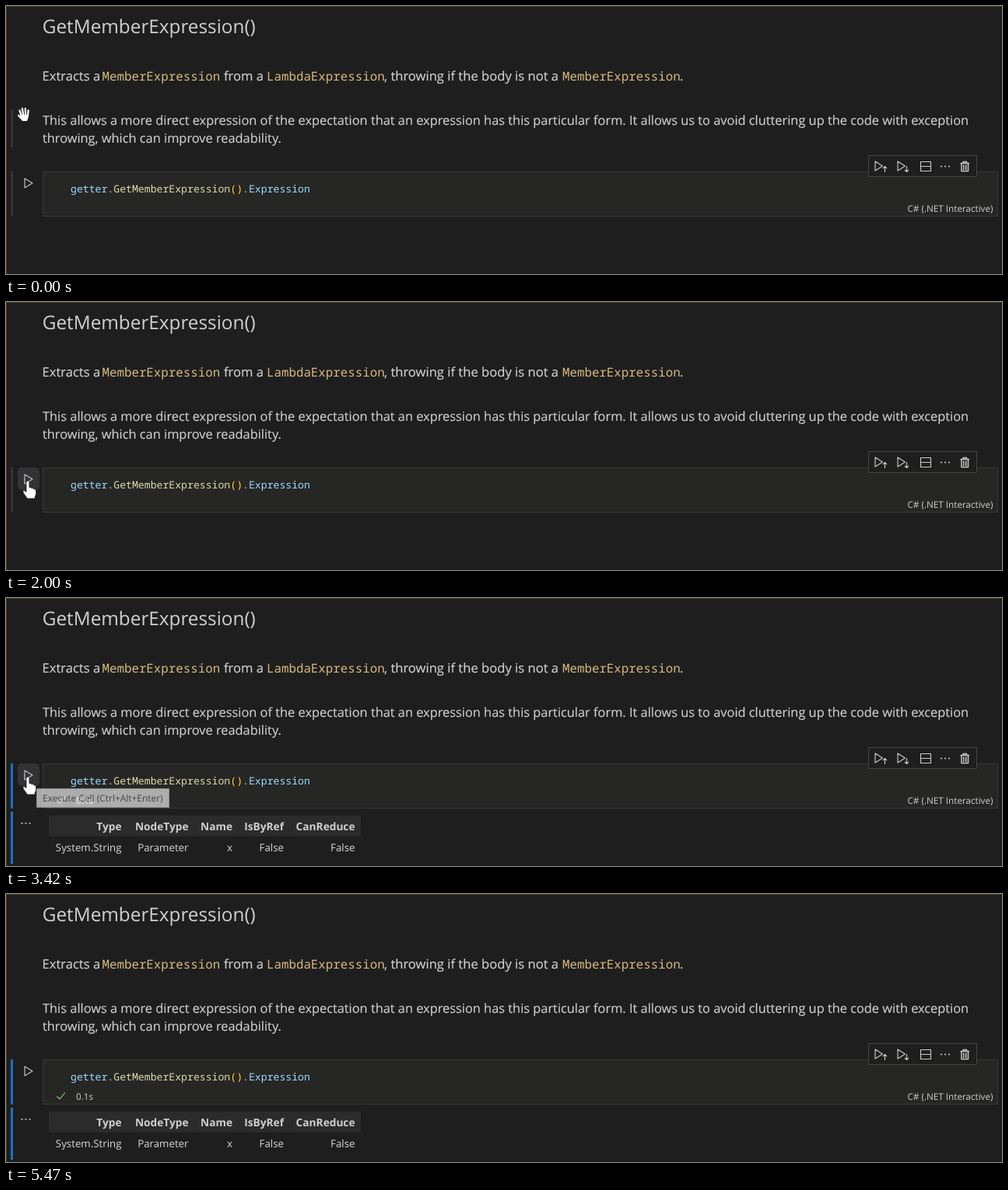
Recreate the animation shown at these times as an HTML page. Size 1280 by 345 pixels, loop 5520 ms.

```html
<!DOCTYPE html>
<html lang="en">
<head>
<meta charset="utf-8">
<title>Notebook cell</title>
<style>
html, body { margin: 0; width: 100%; height: 100%; overflow: hidden; background: #1e1e1e; }
svg { display: block; width: 100vw; height: 100vh; }
text { font-family: "Open Sans", "Noto Sans", sans-serif; fill: #d0d0d0; text-rendering: geometricPrecision; }
.h { font-size: 24.3px; }
.p { font-size: 16.37px; }
.lead { font-size: 16.6px; }
.p text { stroke: #d0d0d0; stroke-width: .15; }
.t { font-size: 13.3px; fill: #d8d8d8; }
.b { font-size: 13.7px; font-weight: 700; }
.s { font-size: 11.7px; }
.m, .k { font-family: "Noto Sans Mono", "DejaVu Sans Mono", monospace; font-weight: 500; }
.p .m { font-size: 15.8px; fill: #d7ba7d; stroke: none; }
.k { font-size: 13.17px; fill: #9cdcfe; }
.end { text-anchor: end; }
.icon { fill: none; stroke: #c8c8c8; stroke-width: 1.15; stroke-linejoin: round; }
.dots { fill: #c8c8c8; }
</style>
</head>
<body>
<svg viewBox="0 0 1280 345">
  <rect width="1280" height="345" fill="#1e1e1e"/>
  <path d="M0 .5H1280M.5 0V345" stroke="#4f4015" fill="none"/>

  <text class="h" x="46.8" y="35">GetMemberExpression()</text>
  <g class="p">
    <text class="lead" x="46.5" y="96">Extracts a</text>
    <text class="m" x="123.5" y="96">MemberExpression</text>
    <text class="lead" x="280" y="96">from a</text>
    <text class="m" x="335" y="96">LambdaExpression</text>
    <text class="lead" x="486" y="96">, throwing if the body is not a</text>
    <text class="m" x="715" y="96">MemberExpression</text>
    <text x="866" y="96">.</text>
    <text x="47" y="153">This allows a more direct expression of the expectation that an expression has this particular form. It allows us to avoid cluttering up the code with exception</text>
    <text x="47" y="176">throwing, which can improve readability.</text>
  </g>
  <rect id="noteBar" x="6" y="133" width="3" height="49" fill="#333338"/>

  <g id="insert">
    <g fill="none" stroke="#393939">
      <rect x="565.5" y="176.5" width="58" height="23"/>
      <rect x="640.5" y="176.5" width="87" height="23"/>
    </g>
    <path d="M571 188.5H583M577 182.5V194.5M646 188.5H658M652 182.5V194.5" stroke="#858585" fill="none"/>
    <text class="s" x="589" y="193" style="fill:#858585">Code</text>
    <text class="s" x="664.5" y="193" style="fill:#858585">Markdown</text>
  </g>

  <rect x="47.5" y="213.5" width="1227" height="57" fill="#262625" stroke="#38383b"/>
  <rect id="cellBar" x="6" y="213" width="3" height="58"/>
  <text class="k" x="83" y="239.5">getter<tspan fill="#d4d4d4">.</tspan><tspan fill="#dcdcaa">GetMemberExpression</tspan><tspan fill="#ffd700">()</tspan><tspan fill="#d4d4d4">.</tspan>Expression</text>
  <text class="s end" x="1268.5" y="264.5">C# (.NET Interactive)</text>

  <rect x="1108.5" y="192.5" width="139" height="27" fill="#1e1e1e" stroke="#454545"/>
  <g class="icon">
    <path d="M1117 200L1126.5 206L1117 212ZM1129.5 214V206.5M1127 209L1129.5 206.5L1132 209"/>
    <path d="M1146 200L1155.5 206L1146 212ZM1157.5 206V213.5M1155 211L1157.5 213.5L1160 211"/>
    <path d="M1175.5 200.5H1188.5V212.5H1175.5ZM1175.5 206.5H1188.5"/>
    <path stroke-width="1.5" d="M1226.5 202.5H1238M1230 202.5V200.5H1234.5V202.5M1228 202.5V212.5H1236.5V202.5M1230.8 204.5V211M1233.7 204.5V211"/>
  </g>
  <g class="dots"><circle cx="1202" cy="206.5" r="1.1"/><circle cx="1207" cy="206.5" r="1.1"/><circle cx="1212" cy="206.5" r="1.1"/></g>

  <rect id="hover" x="15" y="213" width="28" height="29" rx="5" fill="#333336"/>
  <path id="play" class="icon" d="M24 222L34 228L24 234Z"/>
  <rect id="stop" class="icon" x="24.5" y="223.5" width="9" height="9"/>

  <g id="spin" class="icon">
    <path d="M-4.6 -1.5A4.8 4.8 0 0 1 4.3 -2.2M4.6 1.5A4.8 4.8 0 0 1 -4.3 2.2M-5.5 -4V-1.2H-2.7M5.5 4V1.2H2.7"/>
  </g>
  <path id="check" d="M65.5 260.5L69 264L76 255.5" fill="none" stroke="#89d185" stroke-width="1.1"/>
  <text id="time" class="s" x="90" y="264.5"></text>

  <g id="output">
    <rect x="6" y="275" width="3" height="67" fill="#1b72bd"/>
    <g class="dots"><circle cx="20.5" cy="290" r="1.1"/><circle cx="25.5" cy="290" r="1.1"/><circle cx="30.5" cy="290" r="1.1"/></g>
    <rect x="55" y="280" width="401" height="27" fill="#2b2b2b"/>
    <g id="table"></g>
  </g>

  <g id="tip">
    <rect x="39.5" y="245.5" width="170" height="24" fill="#fff" stroke="#c8c8c8"/>
    <text x="47" y="262" style="font-size:11.95px;fill:#555">Execute Cell (Ctrl+Alt+Enter)</text>
  </g>

  <g id="grab" stroke-linecap="round" stroke-linejoin="round">
    <path d="M-3 2L-5 -4.5M-.4 1L-1.6 -7M2.6 1L2.4 -7M5.4 3L6.2 -4.5" stroke="#fff" stroke-width="2.3" fill="none"/>
    <path d="M-3 5.5L-6.5 2" stroke="#fff" stroke-width="2.3"/>
    <path d="M-4 1H6.6L6 5L4.5 9H-1.5L-4.5 5Z" fill="#fff"/>
  </g>
  <path id="point" d="M-2 1a2 2 0 0 1 4 0V8c1-1 3-.5 3 1c1-1 3-.3 3 1.2c1-.7 2.7 0 2.7 1.8V15c0 3-1.7 4-1.7 7H-1c0-2-4-5-5-8c-.8-2 1-3 2.2-2L-2 13.5Z" fill="#fff" stroke="#151515" stroke-width=".8"/>
</svg>
<script>
const LOOP = 5520;
const ids = ["noteBar", "insert", "cellBar", "hover", "play", "stop", "spin", "check", "time", "output", "table", "tip", "grab", "point"];
const el = Object.fromEntries(ids.map(id => [id, document.getElementById(id)]));

const columns = [
  [148.5, "Type", "System.String"], [234.5, "NodeType", "Parameter"],
  [291, "Name", "x"], [357, "IsByRef", "False"], [448.5, "CanReduce", "False"]
];
el.table.innerHTML = columns.map(([x, head, cell]) =>
  `<text class="b end" x="${x}" y="299">${head}</text><text class="t end" x="${x}" y="326">${cell}</text>`).join("");

const clamp = v => Math.min(1, Math.max(0, v));
const mix = (a, b, p) => a + (b - a) * p;
const smooth = p => p * p * (3 - 2 * p);
// Progress from 0 to 1, held between n evenly spaced updates.
const held = (t, from, to, n) => Math.floor(clamp((t - from) / (to - from)) * (n - 1) + 1e-6) / (n - 1);
const show = (node, on) => { node.style.display = on ? "" : "none"; };
const move = (node, x, y, turn = 0) => node.setAttribute("transform", `translate(${x} ${y}) rotate(${turn})`);

function draw(t) {
  const down = held(t, 1050, 1570, 11);
  const enter = held(t, 1630, 2000, 8);
  const leave = held(t, 4890, 5000, 3);
  const onButton = t >= 1780 && t < 4890;
  const running = t >= 2620 && t < 3100;

  move(el.grab, 22.5, mix(139, 205, smooth(down)));
  if (t >= 1630) move(el.grab, mix(22.5, 28, enter), mix(205, 236, smooth(enter)));
  if (t >= 4890) move(el.grab, mix(26, 23, leave), mix(285, 360, leave));
  show(el.grab, !onButton && t < 5000);
  move(el.point, mix(25, 28, enter), mix(214, 231, smooth(enter)));
  show(el.point, onButton);
  show(el.hover, onButton);

  show(el.noteBar, t < 1680);
  el.insert.style.opacity = clamp((down - 0.6) / 0.4) * (1 - clamp(enter * 1.4));

  el.cellBar.setAttribute("fill", t < 2570 ? "#333338" : "#1b72bd");
  show(el.play, !running);
  show(el.stop, running);
  show(el.spin, running);
  move(el.spin, 70.5, 260, Math.floor((t - 2940) / 53) * 18);
  show(el.check, t >= 3100);
  show(el.time, t >= 2620);
  el.time.textContent = t < 2780 ? "0.0s" : "0.1s";
  show(el.output, t >= 2830);

  el.tip.style.opacity = t < 3150 || t >= 4890 ? 0 : (1 + 7 * held(t, 3150, 3570, 8)) / 8;
}

const start = performance.now();
function tick() {
  draw((performance.now() - start) % LOOP);
  requestAnimationFrame(tick);
}
draw(0);
requestAnimationFrame(tick);
</script>
</body>
</html>
```
